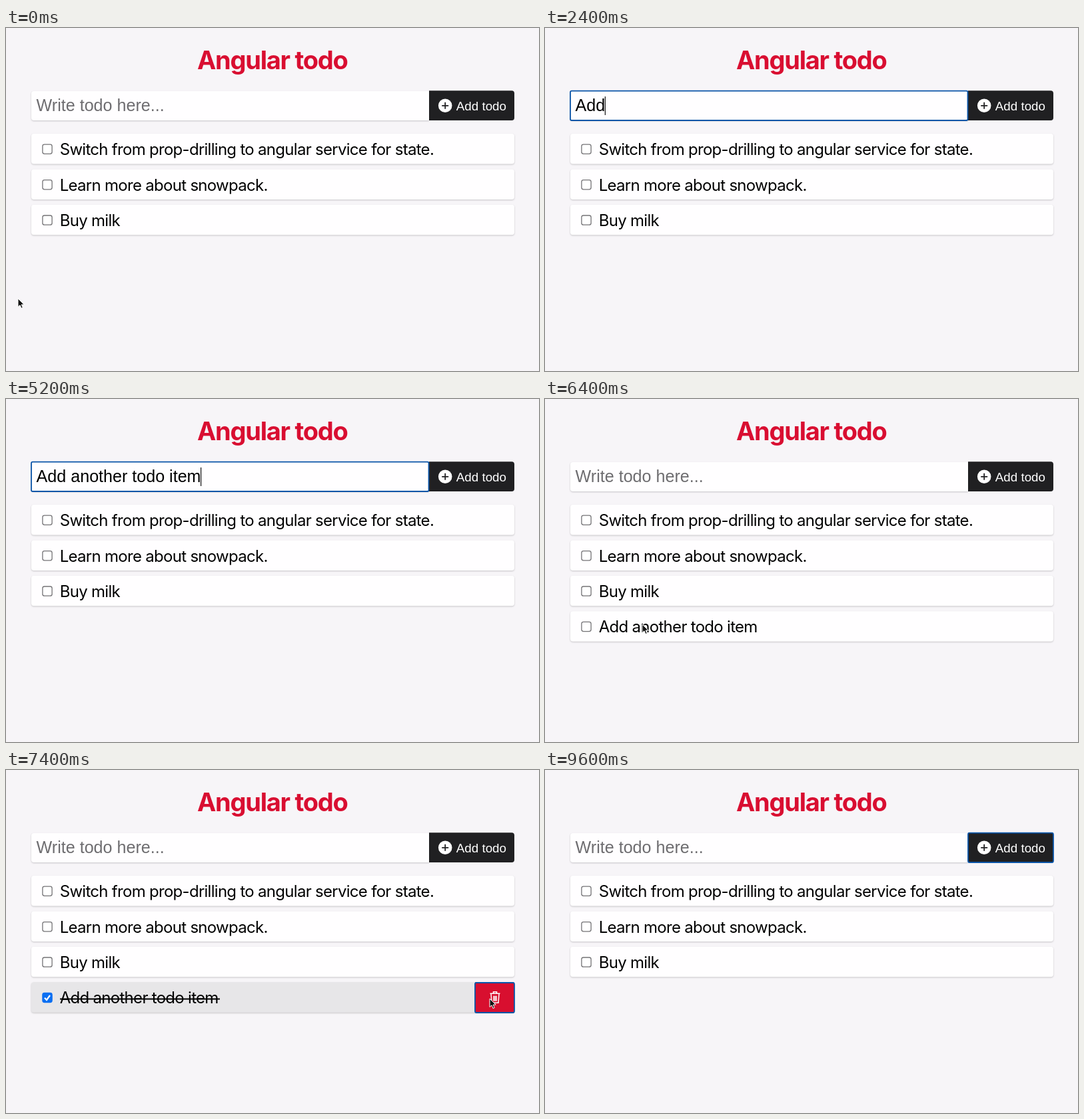
Recreate the animation shown at these times as an HTML page. Size 800x516 px, loop 9800 ms.

```html
<!DOCTYPE html>
<html lang="en">
<head>
<meta charset="utf-8">
<title>Todo list</title>
<style>
html, body { margin: 0; height: 100%; overflow: hidden; background: #f7f5f8; }
svg { display: block; width: 800px; height: 516px; }
text { white-space: pre; }
.title, .item text { font-family: Inter, sans-serif; font-optical-sizing: none; }
.title { font-size: 38px; font-weight: 700; letter-spacing: -.033em; fill: #d90e31; text-anchor: middle; }
.item text { font-size: 24px; letter-spacing: -.0295em; }
.field { font: 25.1px "Liberation Sans", Arial, sans-serif; }
.label { font: 18.8px "Liberation Sans", Arial, sans-serif; fill: #fff; }
.card { fill: #fffeff; filter: drop-shadow(0 1px 1px rgba(0, 0, 0, .2)); }
.ring { fill: none; stroke: #0b55a8; stroke-width: 1.8; }
.box { fill: #fff; stroke: #747376; stroke-width: 1.3; }
.done .card { fill: #e7e6e8; }
.done .box { fill: #0b6ff2; stroke: #0b6ff2; }
.extra { display: none; }
.done .extra { display: inline; }
</style>
</head>
<body>
<svg viewBox="0 0 800 516">
  <text class="title" x="399.8" y="62">Angular todo</text>

  <path class="card" d="M635 95H42a4 4 0 0 0-4 4v36a4 4 0 0 0 4 4h593z"/>
  <text id="field" class="field" x="45.6" y="125"></text>
  <path id="caret" d="M0 103v28" stroke="#111" stroke-width="1.2"/>
  <path d="M635 94.3h124a4 4 0 0 1 4 4V135a4 4 0 0 1-4 4H635z" fill="#202022"/>
  <circle cx="659.2" cy="116.8" r="10.3" fill="#fff"/>
  <path d="M654.2 116.8h10m-5-5v10" stroke="#202022" stroke-width="1.8"/>
  <text class="label" x="675.8" y="123.6">Add todo</text>
  <rect id="inputRing" class="ring" x="38" y="94.7" width="596.5" height="44.3" rx="2"/>
  <rect id="buttonRing" class="ring" x="635" y="94.7" width="128" height="44.3" rx="2"/>

  <g id="list"></g>

  <g stroke-linejoin="round">
    <path id="arrow" d="M0 0v12.5l3-2.6 2 4.7 2.2-1-2-4.5h4z" fill="#111" stroke="#fff"/>
    <path id="beam" d="M-3-8q3 0 3 2V6q0 2-3 2M3-8Q0-8 0-6V6q0 2 3 2" fill="none" stroke="#222" stroke-width="1.2"/>
    <path id="hand" d="M-1.2 1q0-1.5 1.2-1.5T1.2 1v4l5 1q1.4.4 1.2 2l-.8 5.5H-.3L-3.5 8.5q0-1.5 2.3.2z" fill="#fff" stroke="#222" stroke-width=".9"/>
  </g>
</svg>
<script>
const LOOP = 9800, STEP = 200;
const NEW_ITEM = "Add another todo item";
const ITEMS = ["Switch from prop-drilling to angular service for state.", "Learn more about snowpack.", "Buy milk", NEW_ITEM];
const $ = id => document.getElementById(id);
const show = (id, on) => $(id).style.display = on ? "inline" : "none";
const within = (t, a, b) => t >= a && t < b;

$("list").innerHTML = ITEMS.map((text, i) => `
  <g id="item${i}" class="item" transform="translate(38 ${159 + i * 53.4})">
    <rect class="card" width="725" height="45.5" rx="4"/>
    <rect class="box" x="16.9" y="16.2" width="14.2" height="14.2" rx="2.8"/>
    <path class="extra" d="M20 23.5l3 3.3 5-7" fill="none" stroke="#fff" stroke-width="2.2"/>
    <text x="42.7" y="32.2">${text}</text>
    <path class="extra" d="M43 25.3h240" stroke="#000" stroke-width="2"/>
    <g class="extra">
      <path d="M666 0h55a4 4 0 0 1 4 4v37.5a4 4 0 0 1-4 4h-55z" fill="#d80f2f"/>
      <path d="M688.5 17h15m-10-.5v-2h5v2m-8.5 1 1 13.5h10l1-13.5m-8 3v8m2-8v8m2-8v8" fill="none" stroke="#fff" stroke-width="1.5"/>
    </g>
  </g>`).join("") + '<rect id="trashRing" class="ring" x="704" y="320" width="59" height="45" rx="2"/>';

// [time, characters typed]
const TYPING = [[1800, 0], [2000, 1], [2400, 3], [3400, 8], [4000, 12], [5200, 21]];
// [time, x, y] of the pointer, which is hidden while typing
const PATH = [[0, 18, 407], [600, 250, 118], [2000, 250, 118], [5800, 240, 130], [6400, 146, 339],
  [6600, 62, 342], [6800, 62, 342], [7200, 726, 344], [7600, 726, 344], [8200, 560, 118],
  [8400, 674, 119], [9200, 690, 119], [9400, 752, 123]];

function at(keys, t, col) {
  const i = keys.findIndex(k => k[0] > t);
  if (i < 0) return keys.at(-1)[col];
  if (i == 0) return keys[0][col];
  const a = keys[i - 1], b = keys[i];
  return a[col] + (b[col] - a[col]) * (t - a[0]) / (b[0] - a[0]);
}

function drawPointer(t) {
  const visible = t < 2000 || within(t, 5800, 9600);
  const x = at(PATH, t, 1), y = at(PATH, t, 2);
  const inBar = within(y, 95, 139) && within(x, 38, 763);
  const kind = !inBar ? "arrow" : x < 635 ? "beam" : "hand";
  for (const id of ["arrow", "beam", "hand"]) show(id, visible && id == kind);
  $(kind).setAttribute("transform", `translate(${x} ${y})`);
}

function draw(now) {
  const t = Math.floor(now % LOOP / STEP) * STEP;
  const typed = t < 5400 ? NEW_ITEM.slice(0, Math.floor(at(TYPING, t, 1) + .01)) : "";
  const focused = within(t, 1000, 6000) || within(t, 8200, 8800);
  const idleFrom = t < 2000 ? 1000 : t < 8200 ? 5400 : 8200;
  const field = $("field");
  field.textContent = typed || "Write todo here...";
  field.setAttribute("fill", typed ? "#000" : "#6e6d70");
  const width = typed ? field.getComputedTextLength() : 0;
  $("caret").setAttribute("transform", `translate(${45.7 + width} 0)`);
  show("caret", focused && (typed || (t - idleFrom) % 1000 < 500));
  show("inputRing", focused);
  show("buttonRing", t >= 8800);
  show("item3", within(t, 5400, 7600));
  $("item3").classList.toggle("done", t >= 6600);
  show("trashRing", t == 7400);
  drawPointer(t);
}

const start = performance.now();
function tick() {
  draw(performance.now() - start);
  requestAnimationFrame(tick);
}
tick();
</script>
</body>
</html>
```
